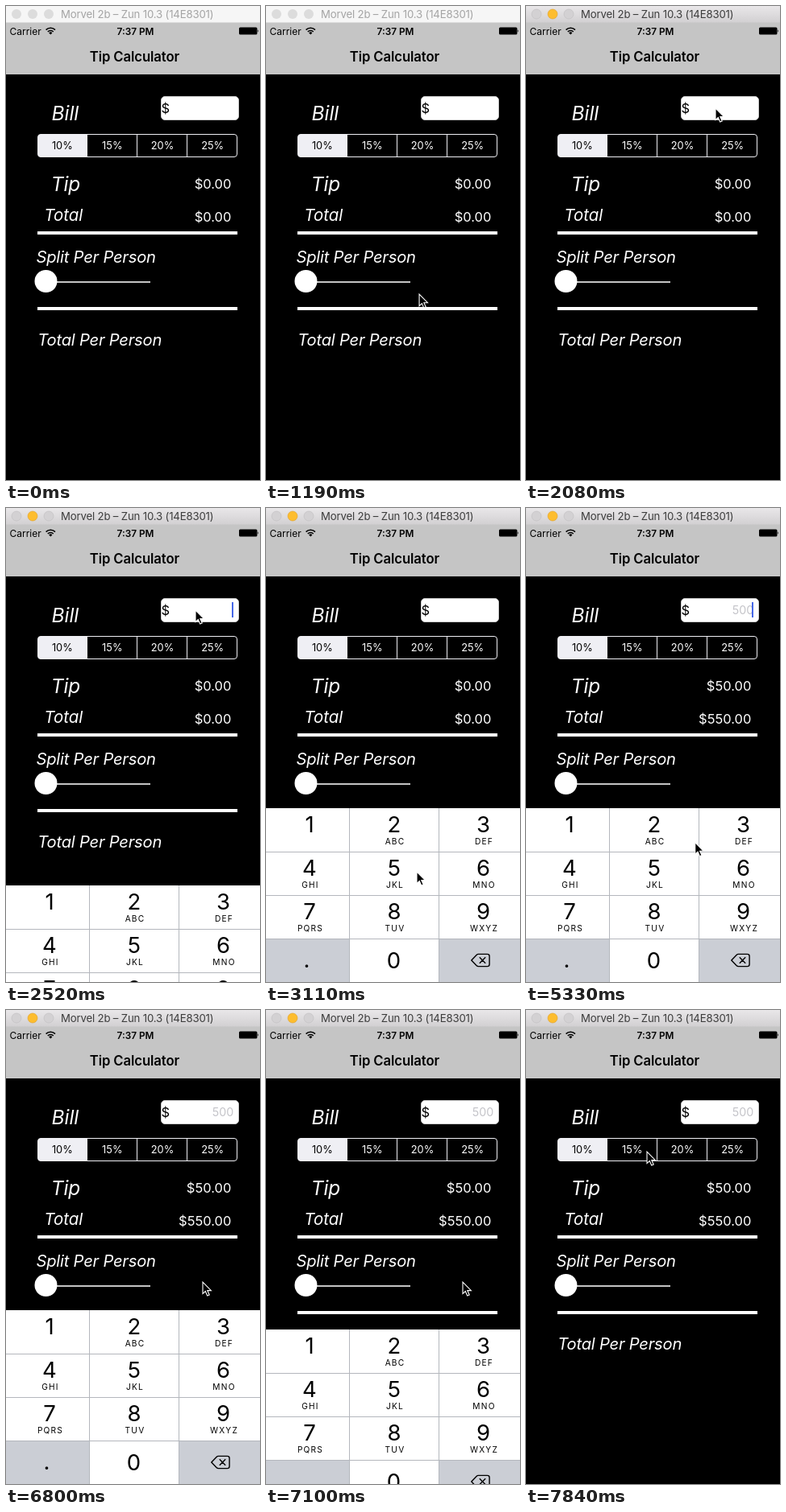
Animation, 315 px wide and 589 px high, one loop 7990 ms. Source, as an HTML page:

```html
<!DOCTYPE html>
<html lang="en">
<head>
<meta charset="utf-8">
<title>Tip Calculator</title>
<style>
  html, body { margin: 0; width: 100%; height: 100%; overflow: hidden; background: #000; }
  svg { display: block; width: 315px; height: 589px; font-family: Inter, "Liberation Sans", sans-serif; }
  .bold { font-weight: 600; }
  .mid { text-anchor: middle; }
  .end { text-anchor: end; }
  .label { fill: #fff; font-style: italic; }
  .money { fill: #fff; font-size: 16.5px; text-anchor: end; }
  .percent { fill: #fff; font-size: 12.8px; text-anchor: middle; }
  .digit { font-size: 27.5px; text-anchor: middle; }
  .letters { font-size: 10.2px; letter-spacing: 1.2px; text-anchor: middle; }
  #bar { fill: #f6f6f6; }
  #title { fill: #a4a4a4; font-size: 13.2px; letter-spacing: -.17px; }
  #lights { fill: #dcdcdc; }
  .active #bar { fill: url(#chrome); }
  .active #title { fill: #3c3c3c; }
  .active #lights { fill: #d3d1d3; stroke: #c0bec0; stroke-width: .6; }
  .active #amber { fill: #fdbd2e; stroke: #e0a028; }
</style>
</head>
<body>
<svg id="stage" viewBox="0 0 315 589">
  <defs>
    <linearGradient id="chrome" x2="0" y2="1">
      <stop stop-color="#e9e7e9"/><stop offset="1" stop-color="#d2d0d2"/>
    </linearGradient>
  </defs>
  <rect width="315" height="589"/>
  <rect y="20" width="315" height="65" fill="#c5c5c5"/>
  <rect id="bar" width="315" height="20.5"/>
  <g id="lights">
    <circle cx="13" cy="10" r="6"/><circle id="amber" cx="33" cy="10" r="6"/><circle cx="53" cy="10" r="6"/>
  </g>
  <text id="title" x="68" y="15">Morvel 2b – Zun 10.3 (14E8301)</text>

  <text x="4.5" y="35.5" font-size="12">Carrier</text>
  <path d="M49.6 29.6a8 8 0 0 1 11.4 0M51.8 32a5 5 0 0 1 7 0" fill="none" stroke="#000" stroke-width="1.6"/>
  <path d="M53.2 33.4a3 3 0 0 1 4.2 0l-2.1 2.2z"/>
  <text class="bold mid" x="160.5" y="35.5" font-size="11.8">7:37 PM</text>
  <rect x="289" y="26.5" width="22.5" height="9" rx="1.5"/>
  <path d="M312.3 29.2q1.8 1.8 0 3.6z"/>
  <text class="bold mid" x="159.4" y="69" font-size="16.7" letter-spacing="-.1">Tip Calculator</text>

  <g class="label">
    <text x="56.5" y="142" font-size="24.4">Bill</text>
    <text x="55.7" y="229.5" font-size="24.4">Tip</text>
    <text x="47.3" y="266.5" font-size="20.5">Total</text>
    <text x="37.5" y="318.5" font-size="20.2" letter-spacing="-.22">Split Per Person</text>
    <text x="39.3" y="421.5" font-size="20.2" letter-spacing="-.22">Total Per Person</text>
  </g>

  <rect x="192.5" y="112.5" width="96" height="29" rx="4.5" fill="#fff" stroke="#ccc"/>
  <text x="192.5" y="133" font-size="16.5">$</text>
  <text id="bill" class="end" x="282.3" y="132.3" font-size="14.3" fill="#c4c4c9"></text>
  <rect id="caret" x="280" y="117" width="2" height="19" fill="#4668e8"/>

  <path d="M101 159.5H43a3.5 3.5 0 0 0-3.5 3.5v21a3.5 3.5 0 0 0 3.5 3.5h58z" fill="#efeff4"/>
  <rect x="39.5" y="159.5" width="247" height="28" rx="3.5" fill="none" stroke="#efeff4"/>
  <path d="M100.5 160v27M162.5 160v27M224.5 160v27" stroke="#efeff4"/>
  <g class="percent">
    <text x="69.8" y="178" fill="#000">10%</text>
    <text x="131.8" y="178">15%</text>
    <text x="194" y="178">20%</text>
    <text x="256.2" y="178">25%</text>
  </g>

  <text id="tip" class="money" x="279.4" y="227"></text>
  <text id="total" class="money" x="279.4" y="267.5"></text>
  <path d="M39 282h248M39 376h248" stroke="#fff" stroke-width="4"/>
  <path d="M60 343h119" stroke="#c4c4c4" stroke-width="2"/>
  <circle cx="49.5" cy="342" r="14" fill="#fff"/>

  <g id="keyboard">
    <rect y="373" width="315" height="216" fill="#fff"/>
    <path d="M0 536h103.5v53H0zM214.5 536H315v53H214.5z" fill="#cbced5"/>
    <rect id="key5" x="104" y="428" width="110" height="53.5" fill="#cbced5"/>
    <rect id="key0" x="104" y="536" width="110" height="53" fill="#cbced5"/>
    <path d="M0 427.5h315M0 481.5h315M0 535.5h315M103.5 373v216M214.5 373v216" stroke="#b4b7bd"/>
    <g id="keys"></g>
    <path d="M254.8 562l6.2-6.6q1-1 2.3-1h11.2q2.6 0 2.6 2.6v10q0 2.6-2.6 2.6h-11.2q-1.3 0-2.3-1zM264.8 558.3l7.4 7.4m0-7.4l-7.4 7.4"
      fill="none" stroke="#000" stroke-width="1.4" stroke-linejoin="round"/>
  </g>

  <path id="cursor" d="M0 0v14.6l3.3-3.1 2.4 5.5 2.5-1.1-2.4-5.3h4.6z" stroke="#fff" stroke-width="1.1"/>
</svg>
<script>
// The picture advances in ticks, as a screen recording does
const LOOP = 7990, START = 890, TICK = 147.7;
const ACTIVATE = 8, FOCUS = 10, BLUR = 41;
const presses = [{ key: "5", at: 18 }, { key: "0", at: 23 }, { key: "0", at: 27 }];

// Cursor stops: where it rests, and when it sets off and arrives
const entry = { x: 163, y: 565 };
const stops = [
  { x: 235, y: 127, go: 0, end: 7 },
  { x: 187, y: 452, go: 11, end: 15 },
  { x: 174, y: 543, go: 19, end: 22 },
  { x: 244, y: 338, go: 28, end: 33 },
  { x: 150, y: 176, go: 43, end: 47 }
];

const $ = id => document.getElementById(id);
const clamp = v => Math.min(1, Math.max(0, v));
const progress = (n, a, b) => clamp((n - a) / (b - a));
const easeOut = (f, power) => 1 - (1 - f) ** power;
const show = (id, on) => $(id).setAttribute("visibility", on ? "visible" : "hidden");
const move = (id, x, y) => $(id).setAttribute("transform", `translate(${x} ${y})`);

function addText(cls, x, y, str) {
  const el = document.createElementNS("http://www.w3.org/2000/svg", "text");
  el.setAttribute("class", cls);
  el.setAttribute("x", x);
  el.setAttribute("y", y);
  el.textContent = str;
  $("keys").append(el);
}
const columns = [54, 159, 269.5];
["", "ABC", "DEF", "GHI", "JKL", "MNO", "PQRS", "TUV", "WXYZ"].forEach((word, i) => {
  const x = columns[i % 3], y = 403 + 54 * Math.floor(i / 3);
  addText("digit", x, y, i + 1);
  addText("letters", x + 1, y + 15, word);
});
addText("digit", 158.5, 572, 0);
addText("digit", 50.5, 571, ".");

// x settles more slowly than y, which bends each leg
function cursorAt(n) {
  const i = Math.max(0, stops.findLastIndex(s => n >= s.go));
  const to = stops[i], from = stops[i - 1] || entry;
  const f = progress(n, to.go, to.end);
  return [from.x + (to.x - from.x) * easeOut(f, 1.4), from.y + (to.y - from.y) * easeOut(f, 1.9)];
}

// Blinks while idle, stays solid while typing
function caretAt(n) {
  if (n < FOCUS || n >= BLUR) return 0;
  const solidEnd = 30, first = presses[0].at;
  if (n >= first && n <= solidEnd) return 1;
  const peak = n < first ? FOCUS + 1 : solidEnd;
  return clamp(.75 + 1.1 * Math.cos(2 * Math.PI * (n - peak) / 7));
}

function draw(t) {
  const n = Math.floor((t - START) / TICK);
  const typed = presses.filter(p => n > p.at).map(p => p.key).join("");
  const shown = easeOut(progress(n, FOCUS, FOCUS + 3), 2) - progress(n, BLUR, BLUR + 3) ** 2;

  $("stage").classList.toggle("active", n >= ACTIVATE);
  $("bill").textContent = typed;
  $("tip").textContent = "$" + (typed * .1).toFixed(2);
  $("total").textContent = "$" + (typed * 1.1).toFixed(2);
  $("caret").setAttribute("opacity", caretAt(n));
  for (const key of ["5", "0"]) show("key" + key, presses.some(p => p.key === key && p.at === n));
  move("keyboard", 0, 216 * (1 - shown));
  show("cursor", n >= 0);
  move("cursor", ...cursorAt(n));
}

const begin = performance.now();
function frame() {
  draw((performance.now() - begin) % LOOP);
  requestAnimationFrame(frame);
}
frame();
</script>
</body>
</html>
```
